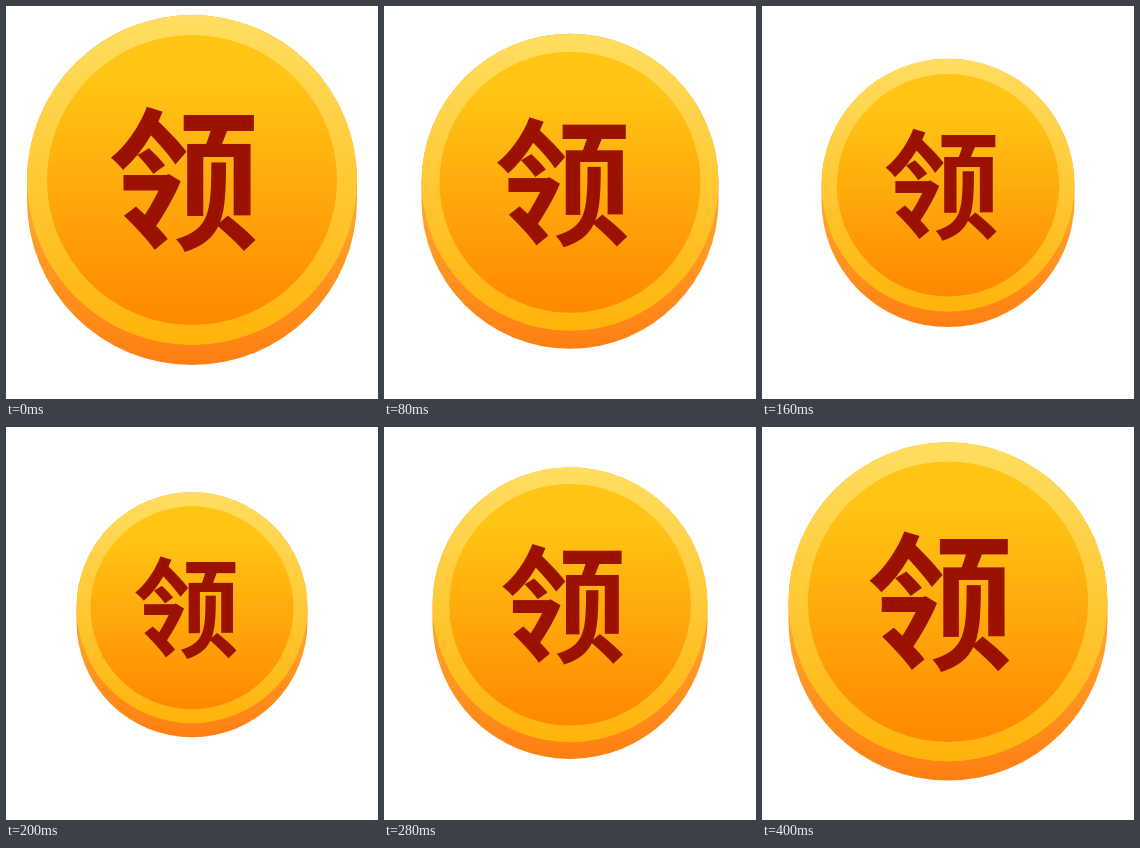
An HTML page that plays this animation: 372x393 px, repeating every 440 ms.

```html
<!DOCTYPE html>
<html lang="zh-CN">
<head>
<meta charset="utf-8">
<style>
  html, body { margin: 0; width: 100%; height: 100%; overflow: hidden; background: #fff; }
  svg { display: block; }
  text { font: 700 152px "Noto Sans CJK SC", "Noto Sans CJK", sans-serif; fill: #9c1200; text-anchor: middle; }
</style>
</head>
<body>
<svg width="372" height="393" viewBox="0 0 372 393">
  <defs>
    <linearGradient id="side" x2="0" y2="1">
      <stop offset=".6" stop-color="#ffa028"/>
      <stop offset="1" stop-color="#ff7f12"/>
    </linearGradient>
    <linearGradient id="rim" x2="0" y2="1">
      <stop stop-color="#ffde60"/>
      <stop offset="1" stop-color="#ffb30a"/>
    </linearGradient>
    <linearGradient id="face" x2="0" y2="1">
      <stop offset=".16" stop-color="#ffc414"/>
      <stop offset="1" stop-color="#ff8800"/>
    </linearGradient>
  </defs>
  <g id="coin">
    <rect x="21" y="9" width="330" height="350" rx="165" fill="url(#side)"/>
    <circle cx="186" cy="174" r="165" fill="url(#rim)"/>
    <circle cx="186" cy="174" r="145" fill="url(#face)"/>
    <text x="178" y="231">领</text>
  </g>
</svg>
<script>
  const coin = document.getElementById("coin");
  const STEP = 40, COUNT = 11;

  // Shrinks to 70% and back, slower near full size.
  function scaleAt(i) {
    const away = Math.min(i, COUNT - i);
    const slow = i < 6 ? Math.min(i, 1) : Math.min(COUNT - i, 3);
    return 1 - (2 * away - slow) / 30;
  }

  function draw(now) {
    const s = scaleAt(Math.floor(now / STEP) % COUNT);
    coin.setAttribute("transform", `translate(186 196.5) scale(${s}) translate(-186 -196.5)`);
    requestAnimationFrame(draw);
  }
  draw(performance.now());
</script>
</body>
</html>
```
